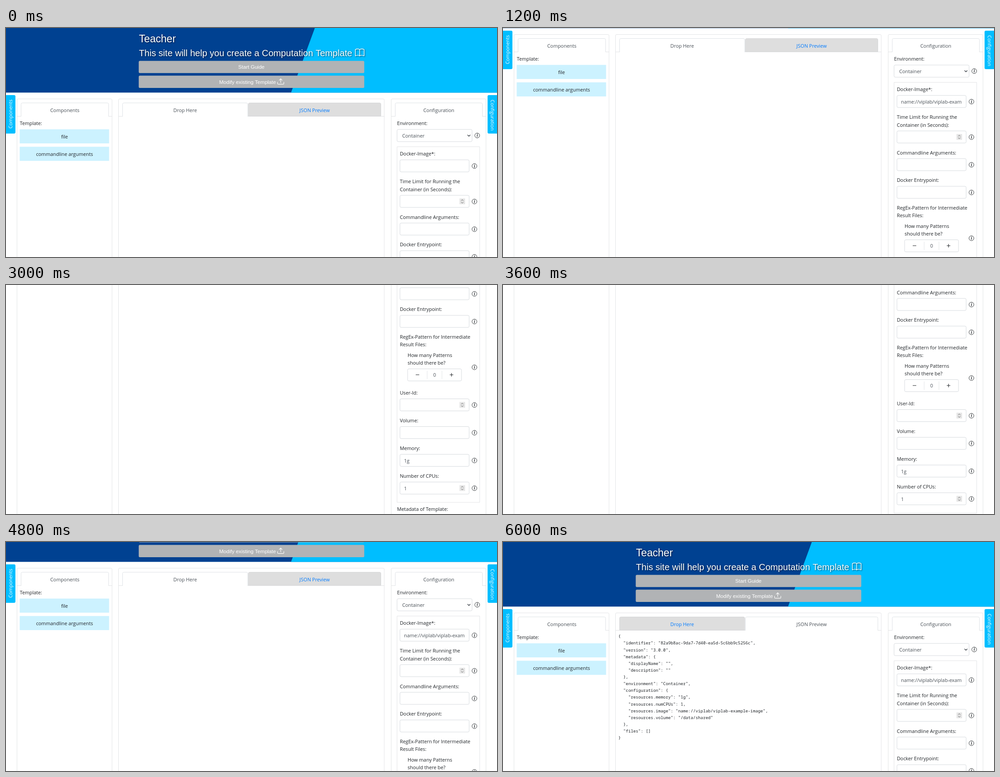
Animation of 1093 by 512 pixels, one loop 7000 ms. Source, as an HTML page with a canvas:

```html
<!DOCTYPE html>
<html lang="en">
<head>
<meta charset="utf-8">
<title>Template editor</title>
<style>
  html, body { margin: 0; width: 100%; height: 100%; overflow: hidden; background: #fff; }
  canvas { display: block; width: 1093px; height: 512px; }
</style>
</head>
<body>
<canvas id="stage"></canvas>
<script>
const W = 1093, H = 512, LOOP = 7000;
const canvas = document.getElementById('stage');
const ctx = canvas.getContext('2d');
const ratio = window.devicePixelRatio || 1;
canvas.width = Math.round(W * ratio);
canvas.height = Math.round(H * ratio);

const UI = '10.84px "Open Sans", "Noto Sans", sans-serif';
const MONO = '9.25px "Noto Sans Mono", "DejaVu Sans Mono", monospace';
const arial = size => `${size}px "Liberation Sans", Arial, sans-serif`;
const INK = '#212529', SOFT = '#495057', LINK = '#007bff';
const NAVY = '#004191', CYAN = '#00beff';
const EDGE = '#e3e4e6', FIELD_EDGE = '#d6dade';

// Each step adds to the state that came before it.
const steps = [
  { at: 0, scroll: 0, image: '', volume: '', memory: '1g', preview: false },
  { at: 600, image: 'name://viplab/viplab-exam' },
  { at: 1200, scroll: 144 },
  { at: 1800, scroll: 360 },
  { at: 2400, scroll: 430, memory: '2g' },
  { at: 3000, memory: '1g' },
  { at: 3600, scroll: 406 },
  { at: 4200, volume: '/data/shared' },
  { at: 4800, scroll: 100 },
  { at: 5400, scroll: 0 },
  { at: 6000, preview: true }
];

const json = JSON.stringify({
  identifier: '82a9b8ac-9da7-7d40-ea5d-5c6bb9c5256c',
  version: '3.0.0',
  metadata: { displayName: '', description: '' },
  environment: 'Container',
  configuration: {
    'resources.memory': '1g',
    'resources.numCPUs': 1,
    'resources.image': 'name://viplab/viplab-example-image',
    'resources.volume': '/data/shared'
  },
  files: []
}, null, 2).split('\n');

function text(str, x, y, { font = UI, color = INK, align = 'left' } = {}) {
  ctx.font = font;
  ctx.fillStyle = color;
  ctx.textAlign = align;
  ctx.fillText(str, x, y);
}

function box(x, y, w, h, { fill, edge, radius = 0 }) {
  ctx.beginPath();
  ctx.roundRect(x, y, w, h, radius);
  if (fill) { ctx.fillStyle = fill; ctx.fill(); }
  if (edge) { ctx.strokeStyle = edge; ctx.lineWidth = 1; ctx.stroke(); }
}

function stroke(path, color, width, x = 0, y = 0, scale = 1) {
  ctx.save();
  ctx.translate(x, y);
  ctx.scale(scale, scale);
  ctx.strokeStyle = color;
  ctx.lineWidth = width / scale;
  ctx.lineJoin = ctx.lineCap = 'round';
  ctx.stroke(new Path2D(path));
  ctx.restore();
}

function button(label, x, y) {
  box(295.5, y, 502, 27.4, { fill: '#b1b3b5', radius: 2.5 });
  text(label, x, y + 18, { font: arial(11.55), color: '#fff', align: 'center' });
}

function header() {
  ctx.fillStyle = NAVY;
  ctx.fillRect(0, 0, W, 144.4);
  ctx.fillStyle = CYAN;
  ctx.fill(new Path2D('M687.5 0H1093V144.4H634.5Z'));

  ctx.save();
  ctx.shadowColor = 'rgba(0,0,0,.6)';
  ctx.shadowBlur = 3 * ratio;
  ctx.shadowOffsetX = ctx.shadowOffsetY = 1.2 * ratio;
  text('Teacher', 296, 32, { font: arial(23.1), color: '#fff' });
  text('This site will help you create a Computation Template', 296, 62.5,
    { font: arial(20.1), color: '#fff' });
  stroke('M.5 2.5C3 1.3 6.5 1 8 2.8C9.5 1 13 1.3 15.5 2.5V13.5C13 12.4 9.5 12 8 13.6' +
    'C6.5 12 3 12.4 .5 13.5ZM8 2.8V13.6', '#fff', 1.4, 777, 44.8, 1.3);
  ctx.restore();

  button('Start Guide', 546.3, 73.4);
  button('Modify existing Template', 537.7, 106.6);
  stroke('M604.5 121V124.2Q604.5 125.6 606 125.6H617Q618.5 125.6 618.5 124.2V121' +
    'M611.5 122V113.5M608.2 116.8L611.5 113.5L614.8 116.8', '#fff', 1.1);
}

function sideTab(label, x, radius, textX, turn) {
  box(x, 150, 21, 86, { fill: CYAN, radius });
  ctx.save();
  ctx.translate(textX, turn < 0 ? 192.3 : 194.8);
  ctx.rotate(turn * Math.PI / 2);
  text(label, 0, 3.7, { color: '#fff', align: 'center' });
  ctx.restore();
}

function card(x, w) {
  box(x, 158.5, w, 1200, { fill: '#fff', edge: EDGE, radius: 2.5 });
  stroke(`M${x} 197.5H${x + w}`, EDGE, 1);
}

function tab(label, x, w, active) {
  const radius = [3, 3, 0, 0];
  if (active) {
    box(x, 167.5, w, 30.5, { fill: '#fff', radius });
    stroke(`M${x} 197.5V170.5Q${x} 167.5 ${x + 3} 167.5H${x + w - 3}` +
      `Q${x + w} 167.5 ${x + w} 170.5V197.5`, '#dee2e6', 1);
  } else {
    box(x, 167.5, w, 29.5, { fill: '#dedede', edge: '#d6d7d8', radius });
  }
  text(label, x + w / 2, 187.6, { color: active ? SOFT : LINK, align: 'center' });
}

function info(x, y) {
  ctx.beginPath();
  ctx.arc(x, y, 5.4, 0, 7);
  ctx.strokeStyle = INK;
  ctx.lineWidth = 0.9;
  ctx.stroke();
  text('i', x, y + 3.1, { font: 'italic bold 9.5px "Liberation Serif", serif', align: 'center' });
}

function field(lines, y, value = '', spinner = false) {
  lines.forEach((line, i) => text(line, 876.7, y + 4 + i * 17.4));
  const top = y + 13.5 + (lines.length - 1) * 17.4;
  box(877, top, 154, 27, { fill: '#fff', edge: FIELD_EDGE, radius: 2.8 });
  text(value, 886, top + 18, { color: SOFT });
  if (spinner) {
    box(1009.5, top + 7, 12.5, 13, { fill: '#e6e6e6' });
    stroke('M-2.3 -1.6L0 -4L2.3 -1.6M-2.3 1.6L0 4L2.3 1.6', '#666', 1, 1015.7, top + 13.6);
  }
  info(1042.8, top + 13.8);
}

function patternCounter() {
  text('RegEx-Pattern for Intermediate', 876.7, 550);
  text('Result Files:', 876.7, 567.4);
  text('How many Patterns', 894, 590.5);
  text('should there be?', 894, 607.8);
  box(894, 617.5, 120, 27, { fill: '#fff', edge: FIELD_EDGE, radius: 2.8 });
  stroke('M937.5 622V640M970.5 622V640', '#e4e6e8', 1);
  stroke('M912.5 630.8H919.5M988.3 630.8H995.3M991.8 627.3V634.3', INK, 1.1);
  text('0', 954, 635.3, { color: SOFT, align: 'center' });
  info(1042.8, 614);
}

function components() {
  card(24.5, 211.5);
  tab('Components', 33.5, 195, true);
  text('Template:', 30.7, 217);
  ['file', 'commandline arguments'].forEach((label, i) => {
    box(30.5, 226.5 + i * 39, 199, 31.5, { fill: '#ccf2ff' });
    text(label, 130.3, 246.8 + i * 39, { align: 'center' });
  });
}

function workspace(preview) {
  card(250.5, 591.5);
  tab('Drop Here', 259.5, 278.5, !preview);
  tab('JSON Preview', 539.5, 295, preview);
  if (preview) json.forEach((line, i) => text(line, 256.7, 214.3 + i * 15.13, { font: MONO }));
}

function configuration({ image, volume, memory }) {
  card(857.5, 211);
  tab('Configuration', 866.5, 194, true);
  text('Environment:', 870.5, 217);
  box(870.5, 226.8, 167, 27.2, { fill: '#fff', edge: FIELD_EDGE, radius: 2.8 });
  text('Container', 882, 244.8, { color: SOFT });
  stroke('M1027.8 239.3L1030.5 242L1033.2 239.3', '#343a40', 1.3);
  info(1049, 240.3);

  box(870.5, 265.5, 184, 650.5, { edge: EDGE });
  field(['Docker-Image*:'], 281.3, image);
  field(['Time Limit for Running the', 'Container (in Seconds):'], 343.2, '', true);
  field(['Commandline Arguments:'], 422.5);
  field(['Docker Entrypoint:'], 484.4);
  patternCounter();
  field(['User-Id:'], 671, '', true);
  field(['Volume:'], 733, volume);
  field(['Memory:'], 795, memory);
  field(['Number of CPUs:'], 857, '1', true);
  text('Metadata of Template:', 870.5, 935);
}

function draw(time) {
  const state = Object.assign({}, ...steps.filter(step => step.at <= time));
  ctx.setTransform(ratio, 0, 0, ratio, 0, 0);
  ctx.fillStyle = '#fff';
  ctx.fillRect(0, 0, W, H);
  ctx.translate(0, -state.scroll);
  header();
  components();
  workspace(state.preview);
  configuration(state);
  sideTab('Components', 0, [0, 3, 3, 0], 10, -1);
  sideTab('Configuration', 1072, [3, 0, 0, 3], 1083, 1);
}

const start = performance.now();
function tick() {
  draw((performance.now() - start) % LOOP);
  requestAnimationFrame(tick);
}
tick();
</script>
</body>
</html>
```
